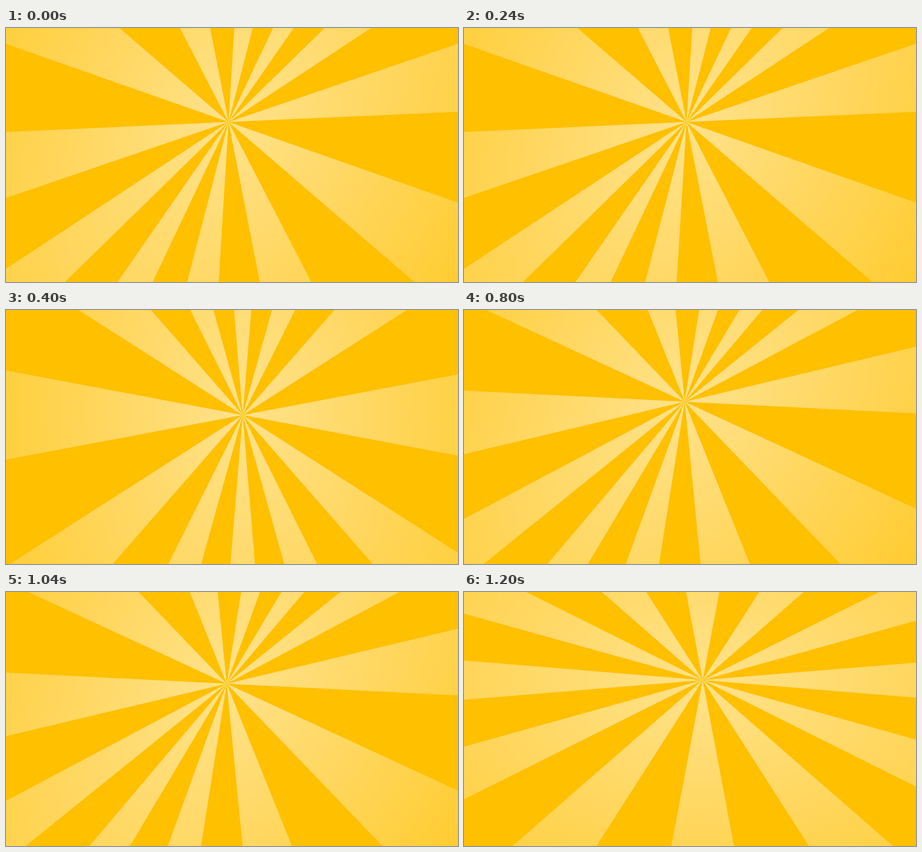
Recreate the animation shown at these times as an HTML page. Size 998x561 px, loop 1600 ms.

```html
<!DOCTYPE html>
<html lang="en">
<head>
<meta charset="utf-8">
<title>Sunburst</title>
<style>
  html, body { margin: 0; width: 100%; height: 100%; overflow: hidden; background: #ffc000; }
  svg { display: block; width: 100%; height: 100%; }
</style>
</head>
<body>
<svg viewBox="0 0 998 561" preserveAspectRatio="none">
  <defs>
    <radialGradient id="glow" gradientUnits="userSpaceOnUse" cx="0" cy="0" r="950">
      <stop offset="0" stop-color="#ffe28c"/>
      <stop offset="1" stop-color="#ffc000"/>
    </radialGradient>
  </defs>
  <rect width="998" height="561" fill="#ffc000"/>
  <path id="rays" fill="url(#glow)"/>
</svg>
<script>
const HOLD = 400;
const RAYS = 12;
const HALF_WIDTH = 7.1; // degrees
const REACH = 1500;
const STRETCH = 1.515;

// One stretched burst, jumping between four poses.
const poses = [
  { x: 491.3, y: 207.6, turn: 30.05 },
  { x: 522.6, y: 232, turn: 0 },
  { x: 487.2, y: 202.6, turn: 35.5 },
  { x: 527, y: 194.6, turn: 90 }
];

const rays = document.getElementById("rays");

function tip(deg) {
  const a = deg * Math.PI / 180;
  return `${(REACH * Math.cos(a)).toFixed(2)} ${(REACH * Math.sin(a)).toFixed(2)}`;
}

function ray(i) {
  const mid = i * 360 / RAYS;
  return `M0 0L${tip(mid - HALF_WIDTH)}L${tip(mid + HALF_WIDTH)}Z`;
}

rays.setAttribute("d", Array.from({ length: RAYS }, (_, i) => ray(i)).join(""));

function draw(ms) {
  const { x, y, turn } = poses[Math.floor(ms / HOLD) % poses.length];
  rays.setAttribute("transform", `translate(${x} ${y}) rotate(${turn}) scale(1 ${STRETCH})`);
}

const start = performance.now();

function tick() {
  draw(performance.now() - start);
  requestAnimationFrame(tick);
}

tick();
</script>
</body>
</html>
```
